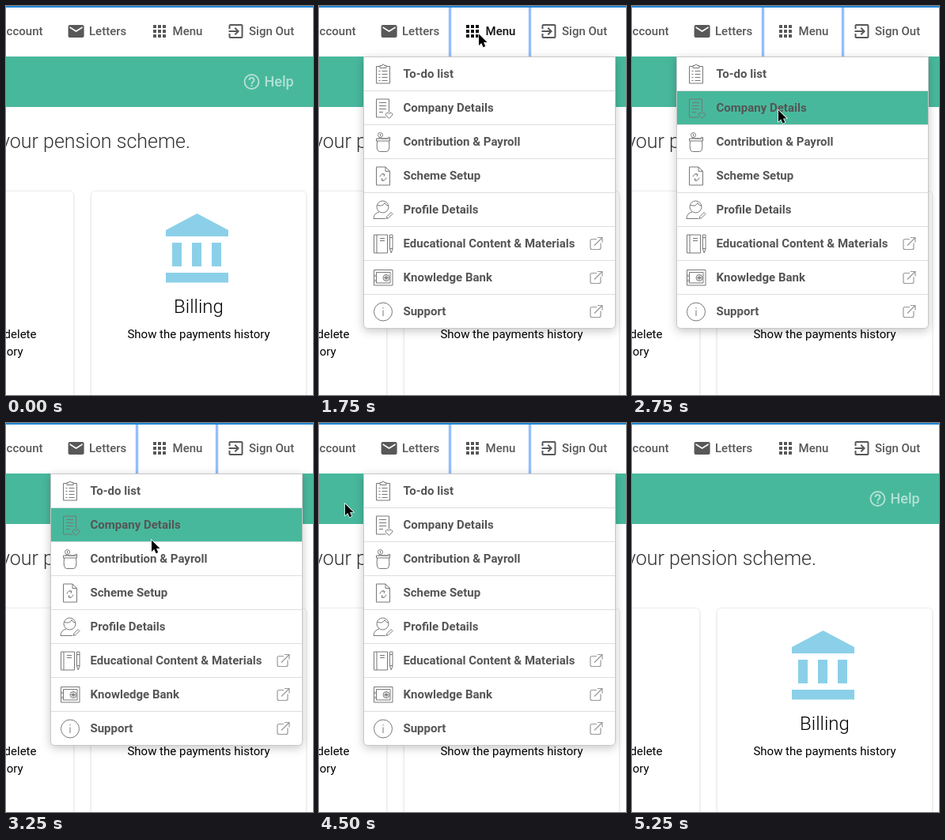
Animation, 388 px wide and 493 px high, one loop 6.5 s. Source, as an HTML page:

```html
<!DOCTYPE html>
<html lang="en">
<head>
<meta charset="utf-8">
<title>Menu hover</title>
<style>
  html, body { margin: 0; width: 100%; height: 100%; overflow: hidden; background: #fff; }
  svg { display: block; width: 100%; height: 100%; }
  text { font-family: Roboto, Arial, sans-serif; font-size: 15px; }
  .nav { fill: #585858; }
  .nav.hover { fill: #111; }
  .nav text, .help text { font-weight: 500; }
  .help { fill: #fff; opacity: .58; }
  .help text { font-size: 18px; }
  .light { font-weight: 300; }
  .end { text-anchor: end; }
  .middle { text-anchor: middle; }
  .card { fill: #fff; stroke: #ececec; filter: drop-shadow(0 1px 1px rgba(0, 0, 0, .12)); }
  .panel { fill: #fff; stroke: #c8c8c8; filter: drop-shadow(0 3px 6px rgba(0, 0, 0, .22)); }
  .row rect.back { fill: none; }
  .row.hover rect.back { fill: #48b89c; }
  .row text { fill: #555; font-weight: 700; }
  .icon { fill: none; stroke: #777; stroke-linejoin: round; }
  .link { fill: none; stroke: #999; stroke-width: 1.2; }
</style>
</head>
<body>
<svg viewBox="0 0 388 493">
  <rect width="388" height="493" fill="#fff"/>
  <rect y="64" width="388" height="64" fill="#48b89c"/>
  <rect width="388" height="2" fill="#1f87d6"/>

  <g class="nav"><text class="end" x="46.5" y="37">My Account</text></g>
  <g class="nav" id="letters">
    <path transform="translate(76.6 20)" d="M20 4H4c-1.1 0-2 .9-2 2v12c0 1.1.9 2 2 2h16c1.1 0 2-.9 2-2V6c0-1.1-.9-2-2-2zm0 4l-8 5-8-5V6l8 5 8-5z"/>
    <text x="105" y="37">Letters</text>
  </g>
  <g class="nav" id="menu">
    <path d="M186 26h16m-16 6h16m-16 6h16" stroke="#585858" stroke-width="4" stroke-dasharray="4 2"/>
    <text x="210.5" y="37">Menu</text>
  </g>
  <g class="nav">
    <path transform="translate(278.5 20)" d="M10.1 15.6l1.4 1.4 5-5-5-5-1.4 1.4 2.6 2.6H3v2h9.7zM19 3H5a2 2 0 0 0-2 2v4h2V5h14v14H5v-4H3v4a2 2 0 0 0 2 2h14a2 2 0 0 0 2-2V5a2 2 0 0 0-2-2z"/>
    <text x="307" y="37">Sign Out</text>
  </g>

  <g class="help">
    <circle cx="310.5" cy="96" r="9" fill="none" stroke="#fff" stroke-width="1.9"/>
    <path d="M307.5 94a3 3 0 1 1 6 0c0 2-3 2.300-3 5" fill="none" stroke="#fff" stroke-width="1.9"/>
    <rect x="309.500" y="100" width="2" height="2"/>
    <text x="326.500" y="102">Help</text>
  </g>

  <text class="light end" x="233" y="180" style="font-size:25px" fill="#333">your pension scheme.</text>
  <rect class="card" x="-60" y="234.5" width="145.5" height="290" rx="5"/>
  <rect class="card" x="107.5" y="234.5" width="272" height="290" rx="5"/>
  <text class="end" x="38.5" y="421">delete</text>
  <text class="end" x="21.5" y="443">history</text>
  <path fill="#8bd0e8" d="M241.500 263l39.500 21v8h-79v-8zM210 300h12v30h-12zm25 0h12v30h-12zm25 0h12v30h-12zM202 338h79v12.500h-79z"/>
  <text class="light middle" x="243.5" y="389" style="font-size:24px">Billing</text>
  <text class="middle" x="243.5" y="421">Show the payments history</text>

  <g id="dropdown">
    <path d="M165.5 2v62m101-62v62" stroke="#c5dcff" stroke-width="4"/>
    <path d="M165.5 2v62m101-62v62" stroke="#82b3fb" stroke-width="2"/>
    <path class="panel" d="M56.500 64.500h318v339a5 5 0 0 1-5 5h-308a5 5 0 0 1-5-5z"/>
    <g id="rows"></g>
  </g>
  <path id="cursor" d="M0 0v14.500l3.300-3.100 2.300 5.300 2.700-1.200-2.300-5.100h4.500z" stroke="#fff" stroke-width="1.400" paint-order="stroke"/>
</svg>
<script>
const LOOP = 6500, OPEN = 1750, CLOSE = 4750, ROW_HEIGHT = 43;
const byId = id => document.getElementById(id);

// Icons are drawn around the centre of their row's icon slot.
const items = [
  ['To-do list', 'M-4-10h-4.500v21.500h17v-21.500h-4.500M-4-8v-3h2.500a1.500 1.500 0 0 1 3 0h2.500v3zM-5.500-4h2m2 0h7m-11 4h2m2 0h7m-11 4h2m2 0h7m-11 4h2m2 0h7'],
  ['Company Details', 'M7.500 5v-16.500h-16v23h12M-5-7h9m-9 4h9m-9 4h9m-9 4h5M7.500 13l-4-4a2 2 0 0 1 4-2 2 2 0 0 1 4 2z'],
  ['Contribution & Payroll', 'M-6.500-9a3 3 0 1 1 6 0a3 3 0 1 1-6 0M-3.500-10.500v3M-6-4.500q2-2 5 0h6l3-2 1 2M-8.500-4.500h17v3h-17zM-7.500-1.500q-1.500 13.500 3 13.500h9q4.500 0 3-13.500'],
  ['Scheme Setup', 'M3-11.500h-11.500v23h17v-17.500zv5.500h5.500M-4 1a4 4 0 0 1 6-3m-2.500-1l2.500 1-1 2.500M4 2a4 4 0 0 1-6 3m2.500 1l-2.500-1 1-2.500'],
  ['Profile Details', 'M-8-4a7.500 7.500 0 1 1 15 0a7.500 7.500 0 1 1-15 0M-5 2.500q-7 2-7 8.500h15M-7-6q7 2 9-3 1 3 5 4M4 11l1-3 5-5 2 2-5 5z'],
  ['Educational Content & Materials', 'M-11.500-11.500h17v23h-17zM-8-11.500v23M-4-7h6m-6 3h6M8.500-11.500h3.500v18l-1.750 5-1.750-5zM8.500-8h3.500m-3.500 14h3.500', true],
  ['Knowledge Bank', 'M-11.500-10h23.500v19.500h-23.500zM-8.500-7h17.500v13.500h-17.500zM-10-4v3m0 3v3M0 0a4 4 0 1 1 8 0a4 4 0 1 1-8 0M1 0h6m-3-3v6m-2-5l4 4m0-4l-4 4', true],
  ['Support', 'M-11.500 0a11.500 11.500 0 1 1 23 0a11.500 11.500 0 1 1-23 0M0-2v7.500M0-5.500v1.500', true]
];

byId('rows').innerHTML = items.map(([label, icon, external], i) => `
  <g class="row" transform="translate(57 ${64.5 + i * ROW_HEIGHT})">
    <rect class="back" y=".5" width="317" height="42"/>
    ${i ? '<path d="M0 0h317" stroke="#dedede"/>' : ''}
    <path class="icon" transform="translate(24 22)" d="${icon}"/>
    <text x="49.500" y="26.500">${label.replace('&', '&amp;')}</text>
    ${external ? '<path class="link" d="M294 16h-6q-2 0-2 2v9q0 2 2 2h9q2 0 2-2v-6M291 24l10-10m-6 0h6v6"/>' : ''}
  </g>`).join('');
const rows = [...document.querySelectorAll('.row')];

// Pointer positions held from each time on: [ms, x, y]; no position hides it.
const pointer = [
  [0], [1250, 245.5, 60.5], [1500, 202, 35.5], [2250, 188, 93.5], [2500, 188, 97],
  [2750, 185, 132], [3000, 184.5, 135], [3250, 184, 148.5], [4250, 57, 107],
  [4500, 33, 102.5], [4750, 31, 103.5], [5000, 112, 1], [5250]
];

function draw(now) {
  const t = now % LOOP;
  const [, x, y] = pointer.findLast(step => step[0] <= t);
  const visible = x !== undefined;
  const open = t >= OPEN && t < CLOSE;
  const overNav = (left, right) => visible && y < 64 && x >= left && x < right;
  const overMenu = overNav(165, 267);

  byId('letters').classList.toggle('hover', overNav(66, 165));
  byId('menu').classList.toggle('hover', overMenu);
  byId('menu').firstElementChild.setAttribute('stroke', overMenu ? '#111' : '#585858');
  byId('dropdown').style.display = open ? '' : 'none';
  const active = open && x >= 57 ? Math.floor((y - 64.5) / ROW_HEIGHT) : -1;
  rows.forEach((row, i) => row.classList.toggle('hover', i === active));

  byId('cursor').style.display = visible ? '' : 'none';
  if (visible) byId('cursor').setAttribute('transform', `translate(${x} ${y})`);
  requestAnimationFrame(draw);
}

const start = performance.now();
requestAnimationFrame(function first() { draw(performance.now() - start); });
</script>
</body>
</html>
```
